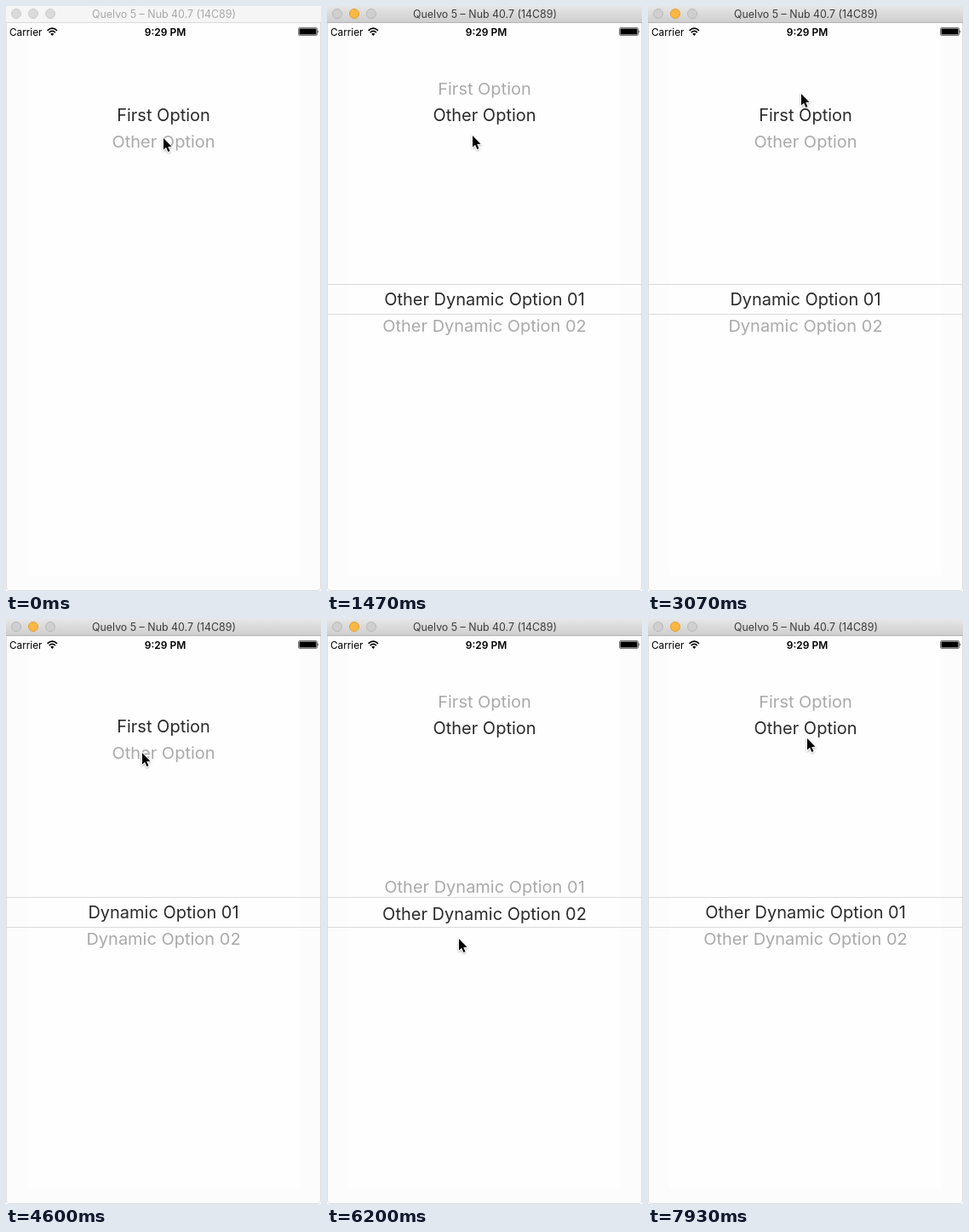
Recreate the animation shown at these times as an HTML page. Size 370 by 686 pixels, loop 8 s.

```html
<!DOCTYPE html>
<html lang="en">
<head>
<meta charset="utf-8">
<title>Linked pickers</title>
<style>
  html, body { margin: 0; width: 100%; height: 100%; overflow: hidden; background: #fff; }
  svg { display: block; width: 370px; height: 686px; font-family: Inter, Roboto, sans-serif; }
  text { text-anchor: middle; }
  .dark { fill: #2b2b2b; font-size: 20px; }
  .pale { fill: #a9a9a9; font-size: 20px; }
  .light { fill: #dadada; stroke: #cbcbcb; }
  .bar { fill: #f5f5f5; }
  .edge { fill: #d9d9d9; }
  .title { fill: #a8a8a8; font-size: 12.4px; }
  .active .bar { fill: url(#chrome); }
  .active .edge { fill: #b4b4b4; }
  .active .title { fill: #3c3c3c; }
  .active .light { fill: #cfcfcf; stroke: #b9b9b9; }
  .active .amber { fill: #fdb843; stroke: #e09f35; }
</style>
</head>
<body>
<svg viewBox="0 0 370 686">
  <defs>
    <linearGradient id="chrome" x2="0" y2="1">
      <stop stop-color="#e7e6e7"/><stop offset="1" stop-color="#cfcecf"/>
    </linearGradient>
    <filter id="soft" x="-50%" y="-50%" width="200%" height="200%">
      <feDropShadow dx="0" dy="1" stdDeviation="1" flood-opacity=".35"/>
    </filter>
    <clipPath id="band"><rect y="-17" width="370" height="34"/></clipPath>
    <clipPath id="around"><path d="M0-90H370V-17H0ZM0 17H370V90H0Z"/></clipPath>
  </defs>

  <path d="M.5 0V682Q.5 685.5 4 685.5H366Q369.5 685.5 369.5 682V0" fill="#fcfcfc" stroke="#dedede"/>
  <rect x="25" y="20" width="320" height="648" fill="#fefefe"/>

  <g id="chromeBar">
    <rect class="bar" width="370" height="19"/>
    <rect class="edge" y="19" width="370" height="1"/>
    <circle class="light" cx="12" cy="9" r="5.5"/>
    <circle class="light amber" cx="32" cy="9" r="5.5"/>
    <circle class="light" cx="52" cy="9" r="5.5"/>
    <text class="title" x="185.5" y="14">Quelvo 5 – Nub 40.7 (14C89)</text>
  </g>

  <g id="status">
    <text x="23.2" y="34.5" font-size="11.8">Carrier</text>
    <text x="187" y="34.5" font-size="12" font-weight="600">9:29 PM</text>
    <g fill="none" stroke="#000" stroke-width="1.7">
      <path d="M48.6 28.8Q54.3 23.6 60 28.8M50.7 31.1Q54.3 27.8 57.9 31.1"/>
    </g>
    <path d="M52.3 32.7Q54.3 31 56.3 32.7L54.3 34.9Z"/>
    <rect x="343.5" y="25.5" width="22" height="9" rx="1.5" fill="none" stroke="#555" stroke-width=".8"/>
    <rect x="344.5" y="26.5" width="20" height="7" rx=".6"/>
    <path d="M366.4 28.2q1.6 1.8 0 3.6Z"/>
  </g>

  <g id="top" transform="translate(0 128.3)"></g>
  <g id="low" transform="translate(0 344.3)"></g>
  <path id="lines" d="M0 326.5H370M0 361.5H370" stroke="#dadada"/>

  <path id="cursor" d="M0 0V13.6L3.1 10.8 5.4 16 7.5 15.1 5.2 10 9.5 9.8Z"
    stroke="#fff" stroke-width="1.6" paint-order="stroke" filter="url(#soft)"/>
</svg>

<script>
const LOOP = 8000, STEP = 1000 / 15, ROW = 31.4, GLIDE = 280;
const $ = id => document.getElementById(id);

// time, x, y of the pointer tip
const POINTER = [
  [0, 185, 155], [66, 170, 156], [267, 170, 156], [333, 164, 147], [533, 164, 147],
  [800, 171, 152], [1667, 171, 152], [2533, 180, 104], [2600, 180, 103], [3200, 180, 103],
  [4067, 161, 155], [4200, 161, 156], [4333, 160, 157], [4867, 160, 157], [5400, 154, 367],
  [5467, 155, 375], [6267, 155, 375], [6400, 152, 366], [6600, 168, 312], [7533, 168, 312],
  [7933, 187, 140]
];
// time of a tap's scroll, row it goes to
const TOP_TAPS = [[1030, 1], [2755, 0], [4555, 1]];
const LOW_TAPS = [[5955, 1], [6875, 0]];
// time, prefix of the lower list
const LISTS = [[1330, "Other Dynamic"], [3063, "Dynamic"], [4863, "Other Dynamic"]];
const ACTIVE_AT = 863;

function makePicker(id) {
  const layer = (clip, kind) =>
    `<g clip-path="url(#${clip})">${`<text class="${kind}"></text>`.repeat(2)}</g>`;
  const root = $(id);
  root.innerHTML = layer("around", "pale") + layer("band", "dark");
  const rows = [...root.querySelectorAll("text")];
  return {
    label(names) {
      rows.forEach((row, i) => {
        if (row.textContent !== names[i % 2]) row.textContent = names[i % 2];
      });
    },
    scroll(pos) {
      rows.forEach((row, i) => {
        const y = (i % 2 - pos) * ROW;
        const squash = i < 2 ? 0.94 : 1;
        row.setAttribute("transform", `translate(185 ${y + 7.1 * squash}) scale(1 ${squash})`);
      });
    }
  };
}

const clamp = v => Math.min(1, Math.max(0, v));
const ease = v => (1 - Math.cos(Math.PI * clamp(v))) / 2;

function scrollAt(taps, t) {
  return taps.reduce((pos, [at, row]) => pos + (row - pos) * ease((t - at) / GLIDE), 0);
}

function pointerAt(t) {
  const i = POINTER.findIndex(key => key[0] > t);
  if (i < 0) return POINTER[POINTER.length - 1].slice(1);
  const [t0, x0, y0] = POINTER[i - 1], [t1, x1, y1] = POINTER[i];
  const k = ease((t - t0) / (t1 - t0));
  return [x0 + (x1 - x0) * k, y0 + (y1 - y0) * k];
}

const top_ = makePicker("top"), low = makePicker("low");
top_.label(["First Option", "Other Option"]);

function draw(time) {
  const t = Math.floor((time % LOOP + 4) / STEP) * STEP % LOOP;
  const list = LISTS.filter(([at]) => at <= t).pop();

  $("chromeBar").setAttribute("class", t >= ACTIVE_AT ? "active" : "");
  top_.scroll(scrollAt(TOP_TAPS, t));
  low.scroll(scrollAt(LOW_TAPS, t));
  $("low").style.display = $("lines").style.display = list ? "" : "none";
  if (list) low.label(["01", "02"].map(n => `${list[1]} Option ${n}`));
  $("cursor").setAttribute("transform", `translate(${pointerAt(t).join(" ")})`);
}

const start = performance.now();
function tick() {
  draw(performance.now() - start);
  requestAnimationFrame(tick);
}
tick();
</script>
</body>
</html>
```
